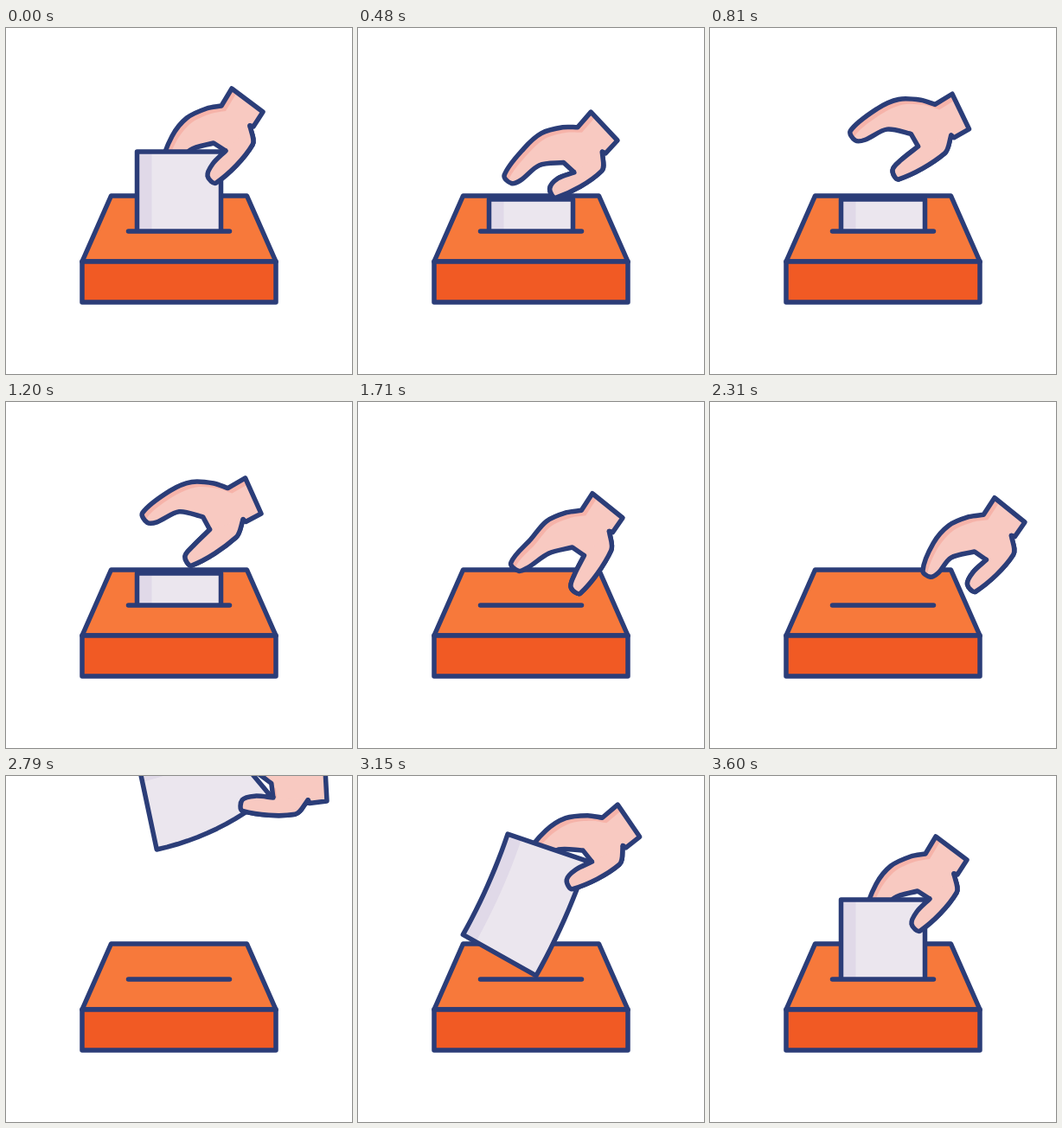
An HTML page with a canvas that plays this animation: 400x400 px, repeating every 4130 ms.

```html
<!DOCTYPE html>
<html lang="en">
<head>
<meta charset="utf-8">
<title>Ballot box</title>
<style>
html, body { margin: 0; height: 100%; overflow: hidden; background: #fff; }
canvas { display: block; width: 400px; height: 400px; }
</style>
</head>
<body>
<canvas width="400" height="400"></canvas>
<script>
const ctx = document.querySelector('canvas').getContext('2d');
const INK = '#2b3d78', SKIN = '#f8c9c1', SKIN_SHADE = '#f6b3a9';
const LOOP = 4130, STEP = 30, SLOT_Y = 235, PAPER_W = 97, PAPER_H = 145;

// One hand, measured from the outer corner of its cuff.
const CUFF = [[-48, -7], [-36, -27], [0, 0], [-11, 17]];
const PALM = [[-15, 16], [-12, 38]];
const THUMB = [[-54, 82], [-64, 74], [-58, 60]];
const WEB = [[-43, 45], [-57, 36]];
const FINGER = [[-98, 62], [-107, 67], [-116, 60]];
const KNUCKLE = [-84, 44];
const BACK = [[-105, 28], [-88, 7], [-65, -4]];

// A pose swings the thumb and the finger (degrees) and lengthens the finger.
const HOLD = { thumb: 0, finger: 0, reach: 1 };
const RELEASE = { thumb: 6, finger: 0, reach: 1.1 };
const OPEN = { thumb: -15, finger: -3, reach: 1.1 };
const PUSH = { thumb: -10, finger: 6, reach: 1.15 };

const KEYS = [
  { t: 0, pose: HOLD, x: 297, y: 97, turn: 0 },
  { t: 270, pose: HOLD, x: 297, y: 152, turn: 0 },
  { t: 480, pose: RELEASE, x: 300, y: 130, turn: 10 },
  { t: 900, pose: OPEN, x: 299, y: 116, turn: 29 },
  { t: 1200, pose: OPEN, x: 295, y: 129, turn: 29 },
  { t: 1500, pose: PUSH, x: 300, y: 170, turn: 2 },
  { t: 1710, pose: PUSH, x: 306, y: 134, turn: 2 },
  { t: 1950, pose: PUSH, x: 312, y: 123, turn: 2 },
  { t: 2310, pose: HOLD, x: 364, y: 139, turn: 2 },
  { t: 2550, pose: HOLD, x: 480, y: -130, turn: 35 },
  { t: 2790, pose: HOLD, x: 371, y: 29, turn: 50 },
  { t: 3270, pose: HOLD, x: 316, y: 77, turn: 8 },
  { t: 3600, pose: HOLD, x: 297, y: 97, turn: 0 },
];

const mix = (a, b, u) => a + (b - a) * u;
const clamp01 = u => Math.max(0, Math.min(1, u));
const rad = degrees => degrees * Math.PI / 180;

function rotate([x, y], degrees, [px, py] = [0, 0], scale = 1) {
  const c = scale * Math.cos(rad(degrees)), s = scale * Math.sin(rad(degrees));
  return [px + (x - px) * c - (y - py) * s, py + (x - px) * s + (y - py) * c];
}

// Speed through a key; zero where the track turns round or rests.
function slope(i, name) {
  const a = KEYS[i - 1], k = KEYS[i], b = KEYS[i + 1];
  if (!a || !b || (k[name] - a[name]) * (b[name] - k[name]) <= 0) return 0;
  return (b[name] - a[name]) / (b.t - a.t);
}

function handAt(t) {
  t = Math.min(t, 3600);
  const i = Math.min(KEYS.findLastIndex(k => k.t <= t), KEYS.length - 2);
  const a = KEYS[i], b = KEYS[i + 1], d = b.t - a.t, u = (t - a.t) / d;
  const track = name => mix(a[name], b[name], u * u * (3 - 2 * u))
    + d * u * (1 - u) * (slope(i, name) * (1 - u) - slope(i + 1, name) * u);
  const pose = name => mix(a.pose[name], b.pose[name], u);

  const x = track('x'), y = track('y'), turn = track('turn');
  const place = p => {
    const [px, py] = rotate(p, turn);
    return [x + px, y + py];
  };
  const thumb = THUMB.map(p => rotate(p, pose('thumb'), PALM[1]));
  const finger = FINGER.map(p => rotate(p, pose('finger'), WEB[1], pose('reach')));
  return {
    turn, place,
    cuff: CUFF.map(place),
    thumb: [...PALM, ...thumb, WEB[0]].map(place),
    finger: [WEB[1], KNUCKLE, ...finger, ...BACK, CUFF[0]].map(place),
  };
}

// Smooth curve whose handles are in proportion to each span.
function curve(path, points) {
  const handle = (i, length) => {
    const a = points[i - 1] || points[i], b = points[i + 1] || points[i];
    const dx = b[0] - a[0], dy = b[1] - a[1], k = 0.3 * length / Math.hypot(dx, dy);
    return [dx * k, dy * k];
  };
  path.lineTo(...points[0]);
  for (let i = 0; i < points.length - 1; i++) {
    const a = points[i], b = points[i + 1], span = Math.hypot(b[0] - a[0], b[1] - a[1]);
    const [ax, ay] = handle(i, span), [bx, by] = handle(i + 1, span);
    path.bezierCurveTo(a[0] + ax, a[1] + ay, b[0] - bx, b[1] - by, ...b);
  }
}

function polygon(points) {
  const path = new Path2D();
  points.forEach(p => path.lineTo(...p));
  path.closePath();
  return path;
}

function paint(path, fill) {
  if (fill) {
    ctx.fillStyle = fill;
    ctx.fill(path);
  }
  ctx.stroke(path);
}

function drawHand({ cuff, thumb, finger }) {
  const path = new Path2D();
  curve(path, thumb);
  curve(path, finger);
  cuff.forEach(p => path.lineTo(...p));
  path.closePath();
  ctx.save();
  ctx.clip(path);
  ctx.fillStyle = SKIN_SHADE;
  ctx.fill(path);
  ctx.translate(5, 6);
  ctx.fillStyle = SKIN;
  ctx.fill(path);
  ctx.restore();
  ctx.stroke(path);
}

function drawThumb({ thumb }) {
  const path = new Path2D();
  curve(path, thumb);
  paint(path, SKIN);
}

// The sheet hangs from its top right corner and bends along its length.
function drawPaper([x, y], turn) {
  const angle = rad(turn), bend = angle * 0.56;
  const at = (across, v) => {
    const mid = angle + bend * v / 2, end = angle + bend * v;
    return [x - PAPER_H * v * Math.sin(mid) - across * Math.cos(end),
      y + PAPER_H * v * Math.cos(mid) - across * Math.sin(end)];
  };
  const steps = Array.from({ length: 13 }, (_, i) => i / 12);
  const strip = (from, to) => polygon([
    ...steps.map(v => at(from, v)), ...steps.map(v => at(to, 1 - v))]);
  ctx.save();
  ctx.beginPath();
  ctx.rect(0, 0, 400, SLOT_Y);
  ctx.clip();
  ctx.fillStyle = '#ebe6ee';
  ctx.fill(strip(0, PAPER_W));
  ctx.fillStyle = '#e0d9e8';
  ctx.fill(strip(PAPER_W - 17, PAPER_W));
  ctx.stroke(strip(0, PAPER_W));
  ctx.restore();
}

function draw(t) {
  const hand = handAt(t);
  const held = t < 270 || t > 2550;
  const inFront = t > 1000 && t < 2400;
  ctx.fillStyle = '#fff';
  ctx.fillRect(0, 0, 400, 400);
  ctx.strokeStyle = INK;
  ctx.lineWidth = 5.5;
  ctx.lineJoin = ctx.lineCap = 'round';

  paint(polygon([[121.5, 194], [278.5, 194], [312, 270], [88, 270]]), '#f7793b');
  paint(polygon([[88, 270], [312, 270], [312, 317], [88, 317]]), '#f15a24');

  if (!inFront) drawHand(hand);
  if (held) drawPaper(hand.place([-48.5, 46]), hand.turn);
  else if (t < 1500) drawPaper([248.5, mix(198, 240, clamp01((t - 1350) / 150))], 0);
  paint(polygon([[141.5, SLOT_Y], [258.5, SLOT_Y]]));
  if (inFront) drawHand(hand);
  drawThumb(hand);
}

function frame() {
  const t = performance.now() % LOOP;
  draw(Math.floor(t / STEP) * STEP);
  requestAnimationFrame(frame);
}
frame();
</script>
</body>
</html>
```
